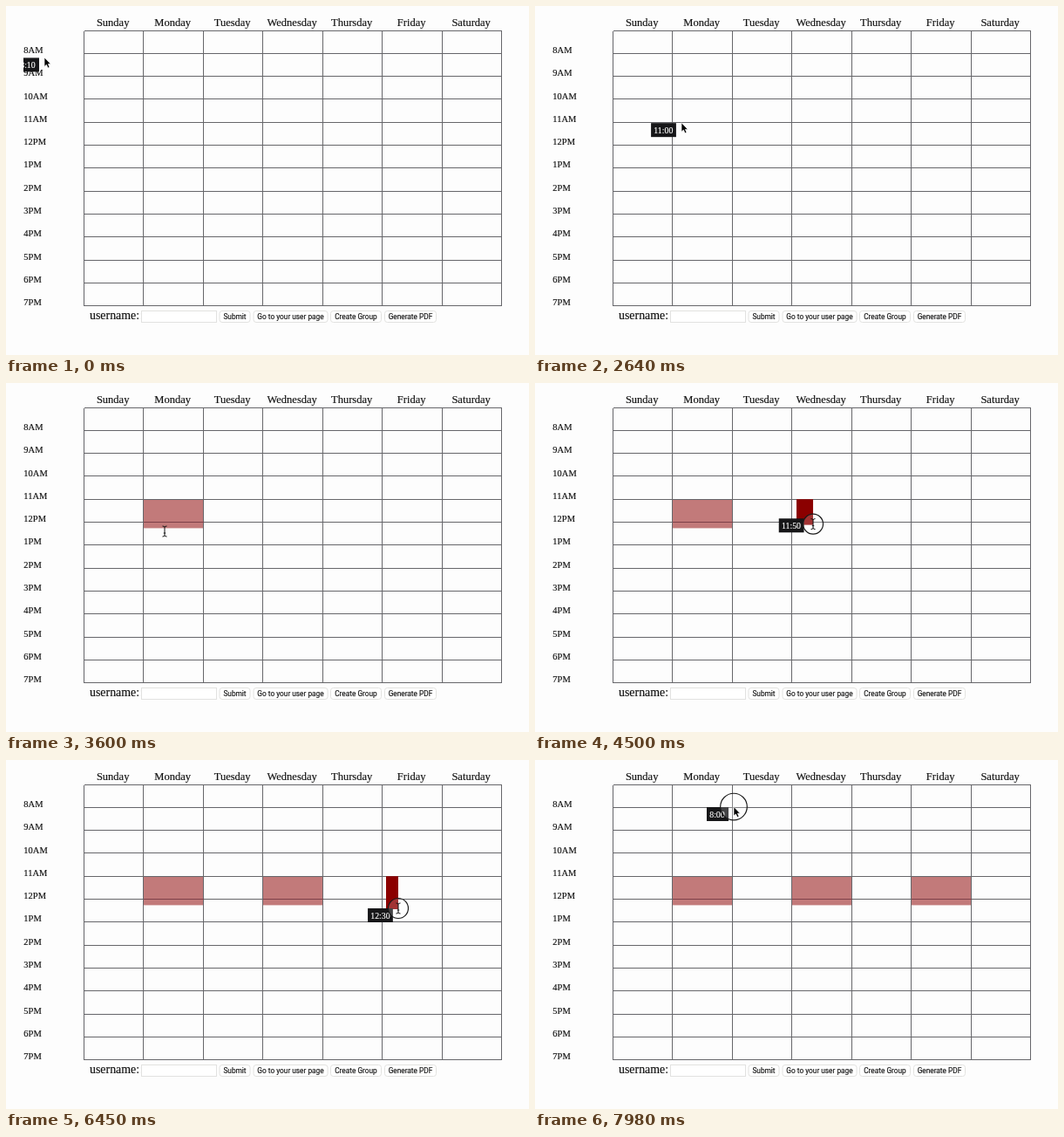
An HTML page that plays this animation: 600x400 px, repeating every 8000 ms.

```html
<!DOCTYPE html>
<html lang="en">
<head>
<meta charset="utf-8">
<title>Weekly schedule</title>
<style>
  html, body { margin: 0; width: 100%; height: 100%; overflow: hidden; background: #fdfdfd; }
  svg { display: block; width: 600px; height: 400px; }
  text { font-family: "Liberation Serif", Times, serif; fill: #111; stroke: #111; stroke-width: .15; }
  .day { font-size: 12.5px; text-anchor: middle; }
  .hour { font-size: 10.5px; }
  .name { font-size: 13.9px; }
  .button text { font-family: Roboto, Arial, sans-serif; font-size: 8.3px; text-anchor: middle; }
  .button rect { fill: #fff; stroke: #e2e2e0; }
  .grid { stroke: #66666a; shape-rendering: crispEdges; }
  .block { fill: #c27a7a; }
  .seam { stroke: #7d4048; shape-rendering: crispEdges; }
  #tip rect { fill: #161618; }
  #tip text { font-size: 9.9px; fill: #fff; stroke: #fff; }
</style>
</head>
<body>
<svg viewBox="0 0 600 400">
  <defs><clipPath id="page"><rect x="20" y="0" width="580" height="400"/></clipPath></defs>
  <g id="blocks"></g>
  <g id="table"></g>
  <g id="form"><text class="name" x="96" y="359">username:</text></g>
  <rect id="drag" fill="#8b0000"/>
  <g clip-path="url(#page)">
    <g id="tip"><rect height="16"/><text x="3.2" y="11.6"></text></g>
  </g>
  <circle id="ring" fill="#fff" fill-opacity=".2" stroke="#1a1a1a" stroke-width="1.2"/>
  <path id="arrow" d="M0 0V10.4L2.4 8.3L4.1 12L6 11.2L4.4 7.6H7.4Z" fill="#000" stroke="#fff" stroke-width=".7"/>
  <path id="beam" d="M-2.5-6Q0-6 0-4.5Q0-6 2.5-6M0-4.5V4.5M-2.5 6Q0 6 0 4.5Q0 6 2.5 6M-1.2 2H1.2" fill="none" stroke="#111"/>
</svg>
<script>
const LOOP = 8000, STEP = 30, LAG = 64;
const LEFT = 89, TOP = 28, COL = 68.5, ROW = 26.3;
const days = ["Sunday", "Monday", "Tuesday", "Wednesday", "Thursday", "Friday", "Saturday"];
const $ = id => document.getElementById(id);

function add(parent, tag, attrs, text = "") {
  const el = document.createElementNS("http://www.w3.org/2000/svg", tag);
  set(el, attrs);
  el.textContent = text;
  parent.append(el);
  return el;
}
function set(el, attrs) {
  for (const key in attrs) el.setAttribute(key, attrs[key]);
}
const show = (el, on) => set(el, { visibility: on ? "visible" : "hidden" });
const move = (el, x, y) => set(el, { transform: `translate(${x.toFixed(2)} ${y.toFixed(2)})` });

// Table and form, with lines on whole pixels
const colX = i => Math.floor(LEFT + i * COL) + .5;
const rowY = i => Math.floor(TOP + i * ROW) + .5;
const line = (cls, x1, y1, x2, y2) => add($("table"), "line", { class: cls, x1, y1, x2, y2 });
for (let i = 0; i <= 7; i++) line("grid", colX(i), rowY(0), colX(i), rowY(12));
for (let i = 0; i <= 12; i++) line("grid", colX(0), rowY(i), colX(7), rowY(i));
days.forEach((day, i) =>
  add($("table"), "text", { class: "day", x: LEFT + (i + .5) * COL - .6, y: 22.9 }, day));
for (let i = 1; i <= 12; i++) {
  const hour = i + 7;
  const label = (hour > 12 ? hour - 12 : hour) + (hour < 12 ? "AM" : "PM");
  add($("table"), "text", { class: "hour", x: 20.3, y: TOP + i * ROW - .4 }, label);
}
function button(x, width, label) {
  const g = add($("form"), "g", { class: "button" });
  add(g, "rect", { x, y: 349.5, width, height: 13, rx: label ? 3 : 0 });
  add(g, "text", { x: x + width / 2, y: 359 }, label);
}
button(155.5, 86, "");
button(245, 35, "Submit");
button(284, 85, "Go to your user page");
button(372.5, 58, "Create Group");
button(434.5, 59, "Generate PDF");

// Pointer path: time, x, y
const path = [
  [0, 44, 59], [150, 44, 59], [600, 48, 131], [2160, 166, 133], [2640, 168, 133.8],
  [2760, 163, 133.2], [3400, 182, 170], [3650, 182, 170],
  [4070, 300, 133.2], [4150, 300, 133.2], [4680, 326, 172], [4800, 326, 172],
  [5500, 436, 137], [5750, 436, 133.2], [5860, 436, 133.2], [6420, 450, 170], [6650, 450, 170],
  [7050, 300, 8], [7600, 226, 51], [7800, 228, 53.6], [8000, 228, 53.6]
];
const drags = [
  { col: 1, press: 2760, release: 3500, leave: 3650 },
  { col: 3, press: 4150, release: 4740, leave: 4800 },
  { col: 5, press: 5860, release: 6570, leave: 6650 },
  { col: 2, press: 7930, release: 9000, leave: 9000 }
];

function pointer(t) {
  t = Math.max(0, t);
  let i = 1;
  while (i < path.length - 1 && path[i][0] < t) i++;
  const [t0, x0, y0] = path[i - 1], [t1, x1, y1] = path[i];
  const u = Math.min(1, (t - t0) / (t1 - t0)), s = u * u * (3 - 2 * u);
  return [x0 + (x1 - x0) * s, y0 + (y1 - y0) * s];
}

function clock(y) {
  const minutes = Math.round((7 + (y + 1.4 - TOP) / ROW) * 6) * 10;
  const hour = (Math.floor(minutes / 60) + 11) % 12 + 1;
  return hour + ":" + String(minutes % 60).padStart(2, "0");
}

for (const d of drags.slice(0, 3)) {
  const x = colX(d.col), y = rowY(4) - .5, width = colX(d.col + 1) - x;
  d.block = add($("blocks"), "rect", { class: "block", x, y, width, height: ROW * 1.27 });
  d.seam = line("seam", x, rowY(5), x + width, rowY(5));
}

const tipBox = $("tip").children[0], tipText = $("tip").children[1];

function draw(t) {
  const [x, y] = pointer(t), [tx, ty] = pointer(t - LAG);
  const active = drags.find(d => t >= d.press && t < d.leave);
  const pressed = active && t < active.release;
  const pulled = pressed && active.block;

  for (const d of drags) if (d.block) {
    show(d.block, t >= d.release);
    show(d.seam, t >= d.release);
  }

  show($("drag"), pulled);
  if (pulled) {
    const [px, py] = pointer(active.press);
    set($("drag"), { x: px, y: py, width: Math.max(0, x - px), height: Math.max(0, y + 1 - py) });
  }

  const label = clock(ty), width = label.length > 4 ? 28.8 : 25;
  tipText.textContent = label;
  set(tipBox, { width });
  move($("tip"), tx - 6 - width, ty + .4);
  show($("tip"), !active || pressed);

  show($("ring"), pressed);
  if (pressed) set($("ring"), { cx: x, cy: y, r: Math.max(11.5, 17 - (t - active.press) / 30) });

  const beam = active && t > active.press + 90;
  show($("beam"), beam);
  show($("arrow"), !beam);
  move($("beam"), x, y);
  move($("arrow"), x, y);
}

const start = performance.now();
function frame() {
  const t = (performance.now() - start) % LOOP;
  draw(Math.floor(t / STEP) * STEP);
  requestAnimationFrame(frame);
}
frame();
</script>
</body>
</html>
```
